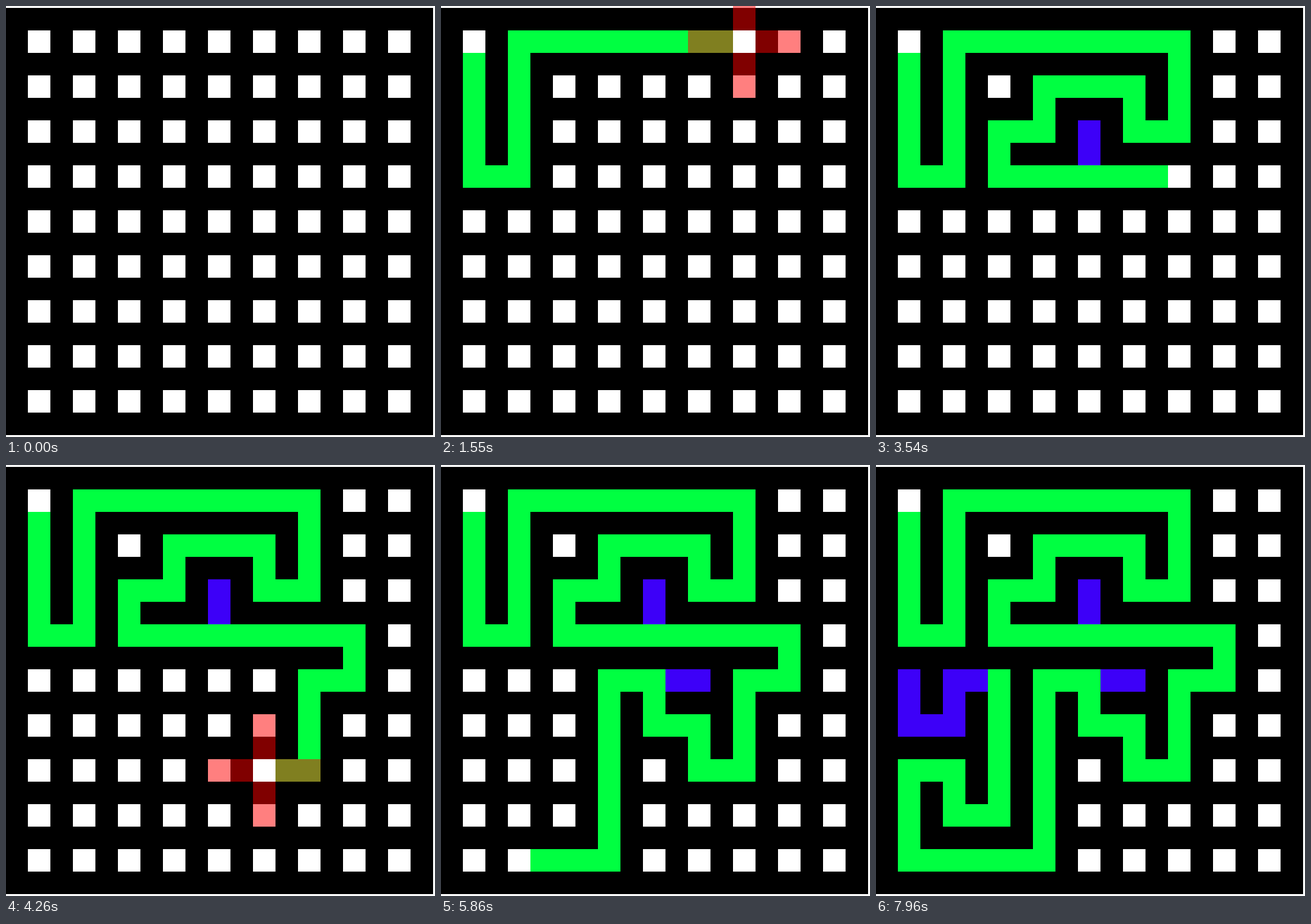
An HTML page with a canvas that plays this animation: 667x671 px, repeating every 8000 ms.

```html
<!DOCTYPE html>
<html lang="en">
<head>
<meta charset="utf-8">
<title>Maze walk</title>
<style>
  html, body { margin: 0; width: 100%; height: 100%; overflow: hidden; background: #fff; }
  canvas { display: block; }
</style>
</head>
<body>
<canvas width="667" height="671"></canvas>
<script>
const canvas = document.querySelector('canvas');
const ctx = canvas.getContext('2d');
const LOOP = 8000, UNIT = 35, SIZE = 19, TICK_MS = 68;
const GREEN = '#00ff41', BLUE = '#3d00f8', RED = 'rgba(255, 0, 0, 0.5)';
const DIRS = { U: [0, -1], D: [0, 1], L: [-1, 0], R: [1, 0] };

// Depth-first walk; B steps back out of a dead end.
const WALK = 'DDDRUUURRRRRDDLULLDLDRRUB' + 'RRRDLDDLULURB' + 'LDDDDLLLUURDRUUULDLUBBBB';

// [time, tick]; odd ticks move and probe the neighbours, even ticks clear the probe.
const PACE = [
  [0, 0], [130, 1], [870, 13], [1680, 25], [2230, 34], [2360, 35], [2500, 37],
  [3320, 51], [3540, 54], [4130, 64], [4960, 76], [5030, 78], [5790, 89],
  [6610, 102], [6680, 104], [7960, 124]
];

function tickAt(time) {
  const next = PACE.findIndex(([start]) => start > time);
  if (next < 0) return PACE[PACE.length - 1][1];
  const [t0, n0] = PACE[next - 1], [t1, n1] = PACE[next];
  const steps = Math.round((t1 - t0) / TICK_MS);
  const step = Math.floor((time - t0) / (t1 - t0) * steps);
  return n0 + Math.floor((n1 - n0) * step / steps + 0.49);
}

function fill(color, col, row, cols = 1, rows = 1) {
  ctx.fillStyle = color;
  ctx.fillRect(col * UNIT - 1, row * UNIT + 3, cols * UNIT, rows * UNIT);
}

function drawBoard() {
  ctx.fillStyle = '#fff';
  ctx.fillRect(0, 0, canvas.width, canvas.height);
  fill('#000', 0, 0, SIZE, SIZE);
  for (let row = 1; row < SIZE; row += 2)
    for (let col = 1; col < SIZE; col += 2) fill('#fff', col, row);
}

// Draws the trail of the first moves and returns the head's position.
function drawTrail(moves) {
  const trail = [];
  let col = 1, row = 1;
  for (const move of WALK.slice(0, moves)) {
    const back = move === 'B';
    let [dx, dy] = back ? trail.pop() : DIRS[move];
    if (back) [dx, dy] = [-dx, -dy];
    else trail.push([dx, dy]);
    const color = back ? BLUE : GREEN;
    fill(color, col, row);
    fill(color, col + dx, row + dy);
    col += 2 * dx;
    row += 2 * dy;
  }
  fill('#fff', 1, 1);
  return [col, row];
}

function drawProbe(col, row) {
  fill(RED, col - 2, row, 2, 1);
  fill(RED, col + 1, row, 2, 1);
  fill(RED, col, row - 2, 1, 2);
  fill(RED, col, row + 1, 1, 2);
}

function draw(now) {
  // A few ms of lead absorb rounding at the step boundaries.
  const tick = tickAt((now + 6) % LOOP);
  drawBoard();
  const head = drawTrail(Math.ceil(tick / 2));
  if (tick % 2) drawProbe(...head);
  requestAnimationFrame(draw);
}

draw(0);
</script>
</body>
</html>
```
